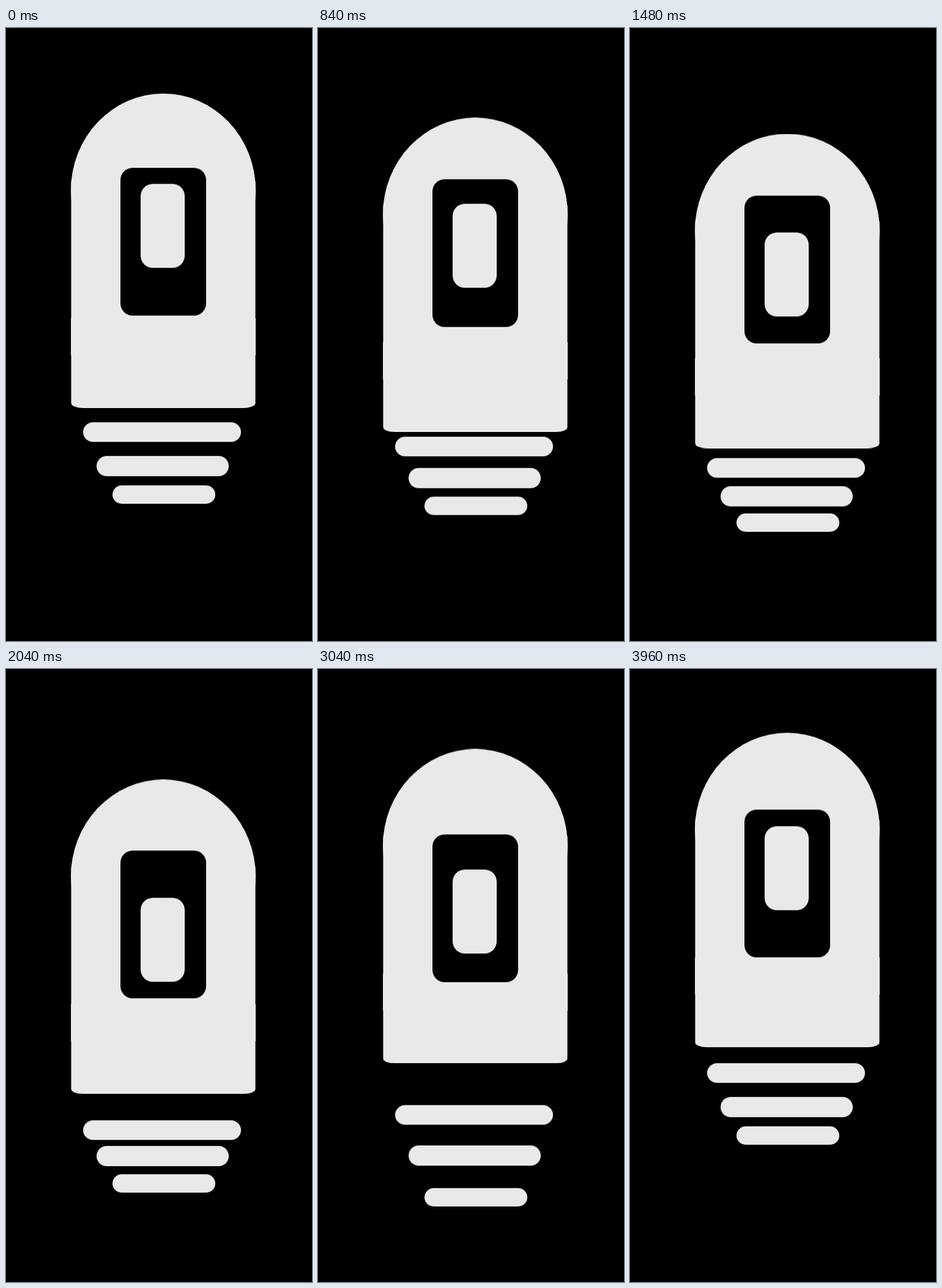
Animation, 500 px wide and 1000 px high, one loop 4000 ms. Source, as an HTML page:

```html
<!DOCTYPE html>
<html lang="en">
<head>
<meta charset="utf-8">
<title>Floating capsule</title>
<style>
  html, body { margin: 0; width: 100%; height: 100%; overflow: hidden; background: #000; }
  svg { display: block; width: 100vw; height: 100vh; fill: #e9e9e9; }
</style>
</head>
<body>
<svg viewBox="0 0 500 1000">
  <g id="body">
    <ellipse cx="257" cy="262" rx="151" ry="158"/>
    <rect x="106.5" y="240" width="301" height="377" rx="20" ry="8"/>
    <rect x="106.1" y="470.5" width="301.8" height="60.5"/>
  </g>
  <rect id="frame" x="187" y="228" width="140" height="241" rx="20" fill="#000"/>
  <rect id="pane" x="220" y="254" width="72" height="137" rx="20"/>
  <rect id="bar1" x="126" y="643" width="258" height="32" rx="16"/>
  <rect id="bar2" x="148" y="698" width="216" height="33" rx="16.5"/>
  <rect id="bar3" x="174" y="746" width="168" height="30" rx="15"/>
</svg>
<script>
  const LOOP = 4000;
  const easeOut = 'cubic-bezier(.167,.167,.667,1)';
  const easeIn = 'cubic-bezier(.333,0,.833,.833)';
  const sink = 'cubic-bezier(.7,.3,.65,1)';

  // Each step: time in ms, vertical shift in px, easing towards the next step.
  const tracks = {
    body: [[0, 0, easeOut], [2000, 78, easeOut], [LOOP, 0]],
    frame: [[0, 0, easeIn], [2000, 68.3, easeIn], [LOOP, 0]],
    pane: [[0, 0, easeIn], [2000, 119.4, easeIn], [LOOP, 0]],
    bar1: [[0, 0, easeIn], [2240, 104.3, sink], [LOOP, 0]],
    bar2: [[0, 0, easeIn], [2500, 104.2, sink], [LOOP, 0]],
    bar3: [
      [0, 0, 'cubic-bezier(.333,0,.8,.73)'],
      [1840, 63, 'cubic-bezier(.333,.667,.667,1)'],
      [2800, 103.6, 'cubic-bezier(.8,0,.3,1)'],
      [LOOP, 0]
    ]
  };

  for (const [id, steps] of Object.entries(tracks)) {
    const keys = steps.map(([time, y, easing = 'linear']) => ({
      offset: time / LOOP,
      transform: `translateY(${y}px)`,
      easing
    }));
    const anim = document.getElementById(id).animate(keys, { duration: LOOP, iterations: Infinity });
    anim.startTime = 0;
    anim.startTime = document.timeline.currentTime;
  }
</script>
</body>
</html>
```
